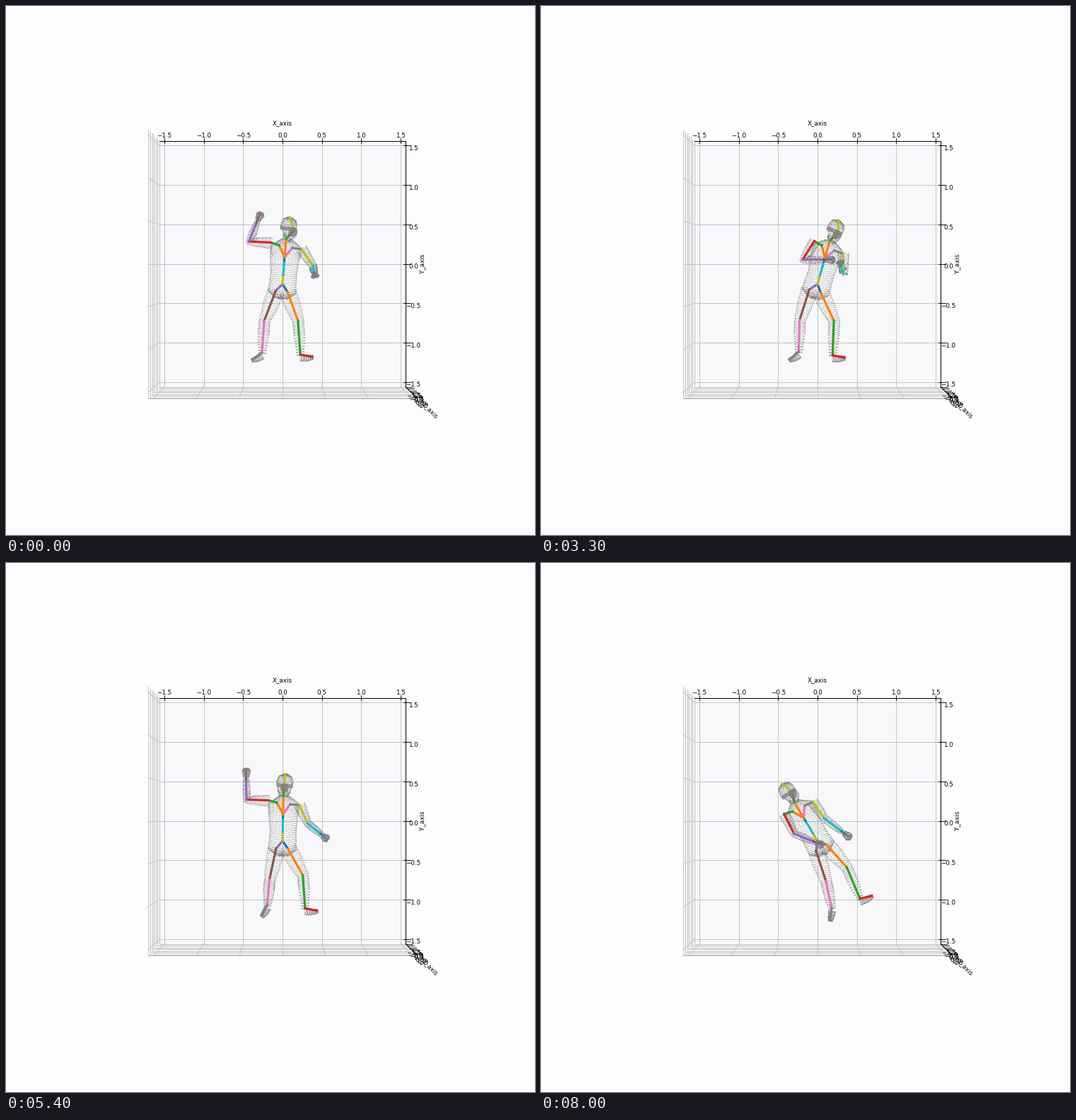
Animation, 748 px wide and 748 px high, one loop 8050 ms. Source, as a matplotlib script:

```python
import numpy as np
import matplotlib.pyplot as plt
from matplotlib.animation import FuncAnimation
from matplotlib.collections import LineCollection

SIZE, DPI = 748, 88
PX = 72 / DPI
FRAMES, STEP = 161, 50
TAB = plt.get_cmap("tab10").colors
GRAY = "#808080"
KHAKI, LILAC, EDGE = "#c6c6b6", "#bebed8", "#bebebe"

plt.rcParams["font.family"] = "DejaVu Sans"
fig = plt.figure(figsize=(SIZE / DPI, SIZE / DPI), dpi=DPI, facecolor="#fdfdff")
ax = fig.add_axes([0, 0, 1, 1])
ax.set_xlim(0, SIZE)
ax.set_ylim(SIZE, 0)
ax.axis("off")

# ---------- the box with its grid ----------
CX, CY, HALF, NEAR = 391, 364.5, 174, 190 / 174


def line(p, q, color=KHAKI, width=1.0):
    ax.plot([p[0], q[0]], [p[1], q[1]], color=color, lw=width * PX, zorder=1)


def label(x, y, text, turn=0):
    ax.text(x, y, text, fontsize=8.8 * PX, color="black", rotation=turn,
            ha="center", va="center", rotation_mode="anchor", zorder=2)


def spot(u, v, k=1.0):
    return CX + u * HALF * k, CY + v * HALF * k


def pane(shade, *corners):
    ax.fill(*zip(*[spot(*c) for c in corners]), color=shade, lw=0, zorder=0)


def draw_box():
    pane("#f8f8fa", (-1, -1), (1, -1), (1, 1), (-1, 1))
    pane("#fafafc", (-1, -1), (-1, 1), (-1, 1, NEAR), (-1, -1, NEAR))
    pane("#f8f8fa", (-1, 1), (1, 1), (1, 1, NEAR), (-1, 1, NEAR))

    ticks = np.arange(-3, 4) / 2
    for v in ticks:
        t = v / 1.5 * 0.96
        line(spot(t, -1), spot(t, 1), LILAC if v == -1.5 else KHAKI)
        line(spot(t, 1), spot(t, 1, NEAR))
        line(spot(-1, -t), spot(1, -t), LILAC if v in (0, 0.5, 1.5) else KHAKI)
        line(spot(-1, -t), spot(-1, -t, NEAR))
        depth = 1 / (1 - (t + 1) / 2 * (1 - 1 / NEAR))
        line(spot(-1, -1, depth), spot(-1, 1, depth), EDGE)
        line(spot(-1, 1, depth), spot(1, 1, depth), EDGE)
    line(spot(-1, -1, NEAR), spot(-1, 1, NEAR))
    line(spot(-1, 1, NEAR), spot(0.94, 1, NEAR))

    line(spot(-1, -1), spot(1, -1), "black")
    line(spot(1, -1), spot(1, 1), "black")
    line(spot(1, 1), spot(1, 1, NEAR), "black")
    for i, v in enumerate(ticks):
        x, y = spot(v * 0.64, -v * 0.64)
        text = f"{v:.1f}".replace("-", "\u2212")
        z = 2.3 * i
        line((x, 187), (x, 194), "black", 0.9)
        line((562, y), (572, y), "black", 0.9)
        line((565 + z, 539 + z), (575 + z, 539 + z), "black", 0.9)
        label(x, 183, text)
        label(576, y + 4.3, text)
        label(577 + 0.9 * z, 552 + z, text)
    label(391, 166, "X_axis")
    label(589, 364, "Y_axis", 90)
    label(600, 572, "Z_axis", -45)


# ---------- motion ----------
# Angles in degrees, 0 hangs down, 90 points right; reach foreshortens the middle bone.
TORSO = [  # ms, lean, look
    (0, 4.5, 10), (1350, 8, 9), (2300, 10, 8), (4250, 20, 5),
    (5400, 1, 0), (5950, -7, 2), (6850, -31, 4), (8000, -31, 6)]
R_ARM = [  # ms, upper, fore, reach
    (0, -93, 158, 1), (850, -92, 158, 1), (1350, -90, 119, 1), (2300, -27, 108, 1),
    (4250, -44, 80, 1), (5100, -94, 204, 1), (5400, -92, 181, 1), (5950, -42, 164, 0.75),
    (6850, -4, 29, 0.75), (7600, -27, -16, 0.75), (8000, 27, 68, 1)]
L_ARM = [
    (0, 34, 12, 0.35), (1350, 23, -145, 0.45), (2300, 0, -177, 0.47), (4250, 4, -132, 0.35),
    (5400, 24, 51, 0.78), (5950, 58, 75, 1), (6850, 70, 91, 1), (8000, 34, 53, 1)]
R_LEG = [  # ms, thigh, shin, foot, reach
    (0, -21, -4, -54, 1), (1350, -22, -4, -56, 1), (2300, -16, 0, -47, 1), (3400, -18, -2, -50, 1),
    (4250, -25, -7, -80, 1.05), (5400, -12, -5, -27, 0.8), (6250, 0, 5, -12, 1),
    (6850, 57, 51, 140, 1.1), (7250, 65, 62, 121, 1.1), (8000, 18, 12, -8, 0.87)]
L_LEG = [
    (0, 20, 4, 79, 1), (2300, 31, 2, 83, 1), (4250, 20, -5, 74, 1.05),
    (5400, 29, 4, 78, 0.97), (6850, 51, 22, 96, 0.97), (8000, 42, 23, 102, 1)]


def smooth(rows):
    """Monotone cubic through the rows, sampled at every frame."""
    rows = np.array(rows, float)
    t, p = rows[:, 0], rows[:, 1:]
    h = np.diff(t)[:, None]
    d = np.diff(p, axis=0) / h
    a, b = d[:-1], d[1:]
    m = np.zeros_like(p)
    same = a * b > 0
    m[1:-1] = np.where(same, 2 * a * b / np.where(same, a + b, 1), 0)
    now = np.arange(FRAMES) * STEP
    i = np.clip(np.searchsorted(t, now, side="right") - 1, 0, len(t) - 2)
    u = (now - t[i])[:, None] / h[i]
    return (p[i] * (1 + 2 * u) * (1 - u) ** 2 + p[i + 1] * u * u * (3 - 2 * u)
            + h[i] * u * (1 - u) * (m[i] * (1 - u) - m[i + 1] * u))


MOVES = [smooth(rows) for rows in (TORSO, R_ARM, L_ARM, R_LEG, L_LEG)]


# ---------- body, points are complex numbers x + iy ----------
PELVIS = 391 + 393j


def mix(a, b, u):
    return a + (b - a) * u


def limb(root, bones, move):
    """Chain of joints from bone lengths and angles."""
    *angles, reach = move
    pts = [root]
    for k, (size, angle) in enumerate(zip(bones, angles)):
        pts.append(pts[-1] + size * (reach if k == 1 else 1) * 1j * np.exp(-1j * np.radians(angle)))
    return pts


def arm(chest, collar, shoulder, bones, move):
    shoulder, elbow, hand = limb(shoulder, bones, move)
    return [chest, collar, shoulder, elbow, mix(elbow, hand, 0.72), hand]


def pose(i):
    (lean, look), r_arm, l_arm, r_leg, l_leg = [m[i] for m in MOVES]
    turn = np.exp(1j * np.radians(lean))
    nod = np.exp(1j * np.radians(1.2 * lean + 4))
    chest, neck = PELVIS - 38j * turn, PELVIS - 64j * turn
    head, face, crown = (neck + nod * v for v in (0.45 * look - 7j, look - 14j, -31j))
    spine = [PELVIS, PELVIS - 13j * turn, PELVIS - 33j * turn, chest, neck, head, face, crown]
    return (spine, nod,
            arm(chest, chest + (-9 - 16j) * turn, chest + (-21 - 19j) * turn, (31, 41), r_arm),
            arm(chest, chest + (10 - 14j) * turn, chest + (23 - 13j) * turn, (28, 43), l_arm),
            [PELVIS] + limb(PELVIS + (-9 + 11j) * turn, (45, 45, 17), r_leg),
            [PELVIS] + limb(PELVIS + (8 + 11j) * turn, (43, 48, 17), l_leg))


def sleeve(pts, radii, rows, dots):
    """Rings of dots around a path."""
    pts = np.array(pts, complex)
    knots = np.arange(len(pts))
    s = np.linspace(0, len(pts) - 1, rows)
    axis = np.interp(s, knots, np.gradient(pts))
    axis = (axis / (abs(axis) + 1e-6))[:, None]
    a = 2 * np.pi * (np.arange(dots) + np.arange(rows)[:, None] % 2 / 2) / dots + 0.3
    ring = axis * (1j * np.cos(a) + 0.15 * np.sin(a))
    return (np.interp(s, knots, pts)[:, None] + np.interp(s, knots, radii)[:, None] * ring).ravel()


def body(spine, nod, r_arm, l_arm, r_leg, l_leg):
    pelvis, low, _, chest, neck, head, face, crown = spine
    hips = mix(r_leg[1], l_leg[1], 0.5)
    crotch = mix(pelvis, hips, 1.8)
    collar = mix(r_arm[1], l_arm[1], 0.5)
    skull, brow = neck - 19j * nod, neck - 15j * nod

    skin = [sleeve([crotch, hips, low, chest, collar, neck], [9, 20, 18.5, 21, 22, 7], 40, 44),
            sleeve([neck, head, skull, mix(skull, crown, 0.7), crown], [6, 9, 12, 9.5, 3], 22, 34)]
    dense = [sleeve([brow - 10.5 * nod, brow + 10.5 * nod], [2.2, 2.2], 12, 7),
             sleeve([mix(face, crown, 0.1), mix(face, head, 0.5), head], [4, 5, 3], 7, 12),
             sleeve([crotch - 4, crotch + 3], [0.8, 0.8], 6, 3)]
    for _, hip, knee, ankle, toe in (r_leg, l_leg):
        skin.append(sleeve([hip, mix(hip, knee, 0.5), knee, mix(knee, ankle, 0.4), ankle],
                           [12, 11, 8, 8, 5], 30, 24))
        skin.append(sleeve([ankle + 4j, mix(ankle, toe, 0.5) + 3j, mix(ankle, toe, 1.05)],
                           [5, 4.5, 3], 13, 22))
    for _, _, shoulder, elbow, wrist, hand in (r_arm, l_arm):
        skin.append(sleeve([shoulder, mix(shoulder, elbow, 0.5), elbow, mix(elbow, wrist, 0.5), wrist],
                           [8, 7, 5.5, 5.5, 4], 26, 22))
        dense.append(sleeve([mix(wrist, hand, 0.3), hand, mix(wrist, hand, 1.3)], [3.5, 5.5, 3], 9, 13))
    return np.concatenate(skin), np.concatenate(dense)


def hues(start, count):
    return [TAB[(start + k) % 10] for k in range(count)]


def skeleton(spine, _, r_arm, l_arm, r_leg, l_leg):
    return [[(p.real, p.imag), (q.real, q.imag)]
            for path in (l_leg, r_leg, spine, l_arm, r_arm) for p, q in zip(path, path[1:])]


draw_box()
skin_dots, = ax.plot([], [], "o", color=GRAY, ms=1.1 * PX, mew=0, alpha=0.55, zorder=3)
bones = LineCollection([], colors=hues(0, 8) + hues(8, 6) + hues(8, 1) + hues(6, 5) + hues(1, 5),
                       linewidths=3.2 * PX, capstyle="projecting", zorder=4)
ax.add_collection(bones, autolim=False)
dense_dots, = ax.plot([], [], "o", color=GRAY, ms=1.7 * PX, mew=0, alpha=0.8, zorder=5)


def draw(i):
    now = pose(i)
    for artist, dots in zip((skin_dots, dense_dots), body(*now)):
        artist.set_data(dots.real, dots.imag)
    bones.set_segments(skeleton(*now))
    return skin_dots, bones, dense_dots


anim = FuncAnimation(fig, draw, frames=FRAMES, interval=STEP, repeat=True, repeat_delay=0)
plt.show()
```
